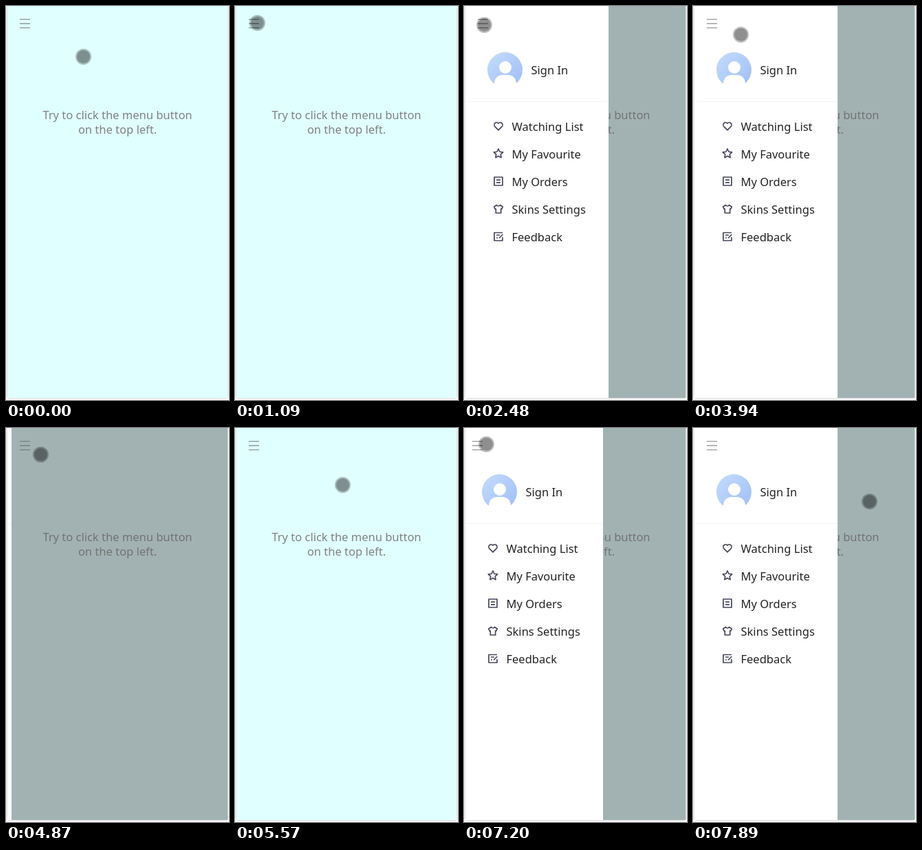
Animation of 324x571 px, one loop 8000 ms. Source, as an HTML page:

```html
<!DOCTYPE html>
<html lang="en">
<head>
<meta charset="utf-8">
<title>Menu drawer</title>
<style>
  html, body { margin: 0; width: 100%; height: 100%; overflow: hidden; background: #fff; }
  #page {
    position: absolute; left: 2px; top: 0; width: 320px; height: 568px;
    background: #e0ffff; box-shadow: 0 0 3px rgba(0, 0, 0, .3);
  }
  svg { position: absolute; left: 0; top: 0; display: block; }
  text { font: 16.5px "Noto Sans", "Open Sans", sans-serif; }
</style>
</head>
<body>
<div id="page"></div>
<svg width="324" height="571" viewBox="0 0 324 571">
  <defs>
    <clipPath id="screen"><rect x="2" width="320" height="568"/></clipPath>
    <linearGradient id="sky" x1="0" y1="0" x2="1" y2="1">
      <stop offset="0" stop-color="#c4dcfc"/>
      <stop offset="1" stop-color="#9fbdf6"/>
    </linearGradient>
    <path id="bars" d="M20 19.3h15M20 25.5h15M20 31.7h15" stroke="#000" stroke-opacity=".4" stroke-width="1.3"/>
  </defs>
  <g clip-path="url(#screen)">
    <use href="#bars"/>
    <g fill="#808080" text-anchor="middle">
      <text x="162" y="164">Try to click the menu button</text>
      <text x="162" y="185">on the top left.</text>
    </g>
    <rect id="shade" x="2" width="320" height="568" fill="#666" fill-opacity=".5"/>
    <g id="drawer">
      <rect x="2" width="208" height="568" fill="#fff"/>
      <use href="#bars"/>
      <circle cx="59.5" cy="92.5" r="25.5" fill="url(#sky)"/>
      <g fill="#fff">
        <circle cx="60" cy="89" r="9"/>
        <path d="M44 119v-6c0-8 5-13 12-13h8c7 0 12 5 12 13v6z"/>
      </g>
      <path d="M2 138.5h208" stroke="#f4f4f4"/>
      <g id="menu" fill="#222"><text x="97.5" y="99">Sign In</text></g>
    </g>
  </g>
  <g id="cursor" fill-opacity=".25"><circle r="11.5"/><circle r="9.5"/></g>
</svg>
<script>
const $ = id => document.getElementById(id);

const star = "M" + Array.from({ length: 10 }, (_, i) => {
  const r = i % 2 ? 3.4 : 7, a = i * Math.PI / 5;
  return [r * Math.sin(a), -r * Math.cos(a)];
}).join("L") + "Z";

// Menu rows: label and an icon drawn around its own centre
const rows = [
  ["Watching List", "M0 5.8L-5.2 .6A3.4 3.4 0 0 1 0 -3.9A3.4 3.4 0 0 1 5.2 .6Z"],
  ["My Favourite", star],
  ["My Orders", "M-6-6H6V6H-6ZM-3-1.8H3M-3 1.8H3"],
  ["Skins Settings", "M-2.5-5.5Q0-2.5 2.5-5.5L6.3-3L4.6 .3L3.7 0V6H-3.7V0L-4.6 .3L-6.3-3Z"],
  ["Feedback", "M6-5.5H-6V6H6V1M-3-2H2M-3 2H-1M1 2.5L6.3-3"]
];
rows.forEach(([label, icon], i) => {
  const y = 174 + 40 * i;
  $("menu").innerHTML += `<text x="69.5" y="${y + 7}">${label}</text>
    <path d="${icon}" transform="translate(50 ${y})" fill="none" stroke="#47475f" stroke-width="1.7" stroke-linejoin="round"/>`;
});

// All motion is counted in ticks, the steps in which the screen refreshes
const LOOP = 8000, FIRST = 295, TICK = 77.45, SLIDE = 500 / TICK;
const OPEN = 21.1, CLOSE = 53.9, REOPEN = 84.1;

// Cursor moves: first tick, last tick, destination
const home = [112.5, 73.5];
const moves = [
  [-1, 6, 33.5, 26.5], [7, 10, 32.5, 24.5], [15, 17, 29.5, 27.5],
  [32, 38, 128.5, 59.5], [41, 47, 69.5, 41.5], [47, 52, 30.5, 20.5],
  [54, 59, 50.5, 38.5], [59, 67, 156.5, 82.5],
  [76, 84, 32.5, 23.5], [89, 98, 256.5, 106.5]
];

const clamp = v => Math.min(1, Math.max(0, v));
const smooth = u => u * u * (3 - 2 * u);

// cubic-bezier(.25, .1, .25, 1)
function ease(x) {
  if (x <= 0 || x >= 1) return clamp(x);
  let lo = 0, hi = 1, s;
  for (let i = 0; i < 20; i++) {
    s = (lo + hi) / 2;
    if (.75 * s * (1 - s) + s ** 3 < x) lo = s; else hi = s;
  }
  return .3 * s * (1 - s) ** 2 + 3 * s * s * (1 - s) + s ** 3;
}

function cursorAt(k) {
  return moves.reduce(([x, y], [from, to, toX, toY]) => {
    const p = smooth(clamp((k - from) / (to - from)));
    return [x + (toX - x) * p, y + (toY - y) * p];
  }, home);
}

function draw(now) {
  const k = Math.floor((now % LOOP - FIRST) / TICK);
  const slide = start => ease((k - start) / SLIDE);
  const out = slide(OPEN) - slide(CLOSE) + slide(REOPEN);
  const shaded = k >= Math.floor(OPEN) && k < CLOSE + SLIDE || k >= Math.floor(REOPEN);
  $("shade").setAttribute("visibility", shaded ? "visible" : "hidden");
  $("drawer").setAttribute("transform", `translate(${Math.round(208 * (out - 1))} 0)`);
  $("cursor").setAttribute("transform", `translate(${cursorAt(k)})`);
  requestAnimationFrame(draw);
}
draw(performance.now());
</script>
</body>
</html>
```
